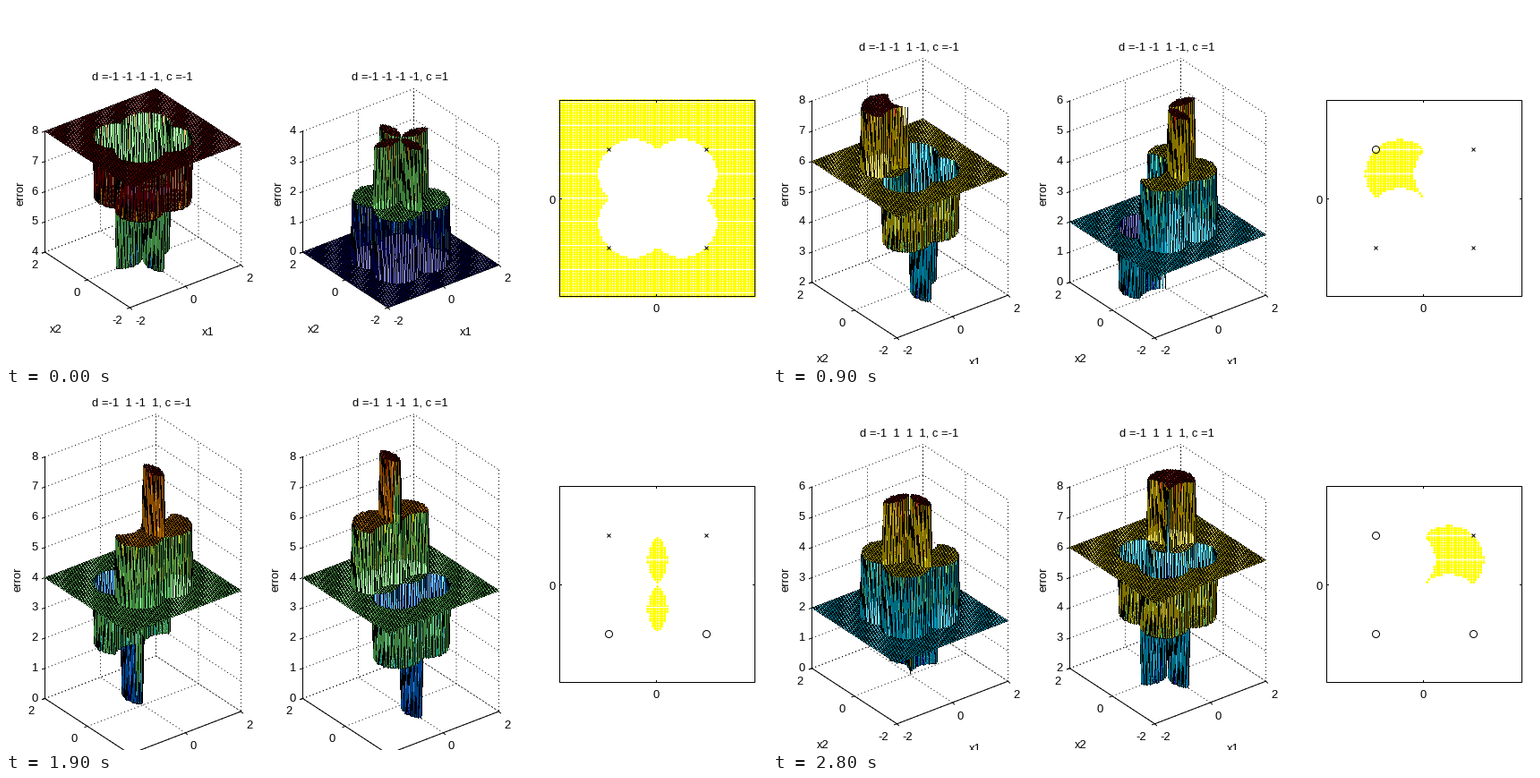
These frames come from a looping animation (850 by 400 pixels, 3250 ms). A matplotlib script:

```python
import itertools

import matplotlib.pyplot as plt
import numpy as np
from matplotlib.animation import FuncAnimation

W, H, DPI = 850, 400, 100
TICK = 50                                  # ms per step
HOLD = [9, 9, 9, 9, 2, 9, 9, 9]            # steps each target vector stays
PT = 72 / DPI                              # one pixel in points
ALPHA = 0.5
SAMPLES = [(1, 1), (1, -1), (-1, 1), (-1, -1)]
TARGETS = [(-1,) + t for t in itertools.product((-1, 1), repeat=3)]
PANELS = [(43, -1), (331, 1)]              # left edge, output weight c
BOX = (618, 836, 105, 324)
CX, CY, UNIT = 727, 214.5, 54.6

plt.rcParams.update({
    "font.family": "Liberation Sans",
    "font.size": 13 * PT,
})

# weight grid with step 0.05, kept as integers so ties are exact
steps = np.arange(-40, 41)
I, J = np.meshgrid(steps, steps, indexing="ij")
FIRES = [np.sign(20 * (a * I + b * J) - (I**2 + J**2)) for a, b in SAMPLES]
jet = plt.get_cmap("jet")


def error(target, c):
    return sum(abs(d - c * f) for d, f in zip(target, FIRES))


def project(x0, x1, x2, z, mid):
    px = x0 + (x1 + 2) * 31 + (2 - x2) * 23.75
    py = 207 - 33.75 * (z - mid) - (x1 + 2) * 11.9 + (2 - x2) * 15.5
    return px, py


def expand(start, count):
    """Turn runs into single positions plus the run each one belongs to."""
    count = count.ravel().astype(int)
    run = np.repeat(np.arange(count.size), count)
    first = np.repeat(np.cumsum(count) - count, count)
    return run, start.ravel()[run] + np.arange(run.size) - first


def fill_quads(img, qx, qy, nx, ny, color):
    n = qx.shape[1]
    cols = np.ceil(qx.min(axis=0)) + np.arange(3)[:, None]
    t = (cols - qx[:, None]) / (nx - qx)[:, None]
    y = qy[:, None] + t * (ny - qy)[:, None]
    hit = (t >= 0) & (t <= 1)
    top = np.where(hit, y, 1e6).min(axis=0)
    bottom = np.where(hit, y, -1e6).max(axis=0)
    start = np.ceil(top)
    run, rows = expand(start, np.maximum(np.floor(bottom) - start + 1, 0))
    r, c = rows.astype(int), cols.ravel()[run].astype(int)
    img[r, c] = img[r, c] * (1 - ALPHA) + color[run % n] * ALPHA


def stroke_edges(img, qx, qy, nx, ny):
    dx, dy = nx - qx, ny - qy
    steep = abs(dy) > abs(dx)
    a, b = np.where(steep, qy, qx), np.where(steep, ny, nx)
    start = np.ceil(np.minimum(a, b))
    run, pos = expand(start, np.ceil(np.maximum(a, b)) - start)
    t = (pos - a.ravel()[run]) / (b - a).ravel()[run]
    c = np.rint(qx.ravel()[run] + t * dx.ravel()[run]).astype(int)
    r = np.rint(qy.ravel()[run] + t * dy.ravel()[run]).astype(int)
    img[r, c] = (0, 0, 0, 1)


def paint_surface(img, x0, err):
    """Translucent faceted surface, painted back to front by diagonals."""
    lo, hi = err.min(), err.max()
    X, Y = project(x0, I / 20, J / 20, err, (lo + hi) / 2)
    colors = jet((err - lo) / (hi - lo))
    last = len(steps) - 2
    for diag in range(2 * last, -1, -1):
        i = np.arange(max(0, diag - last), min(diag, last) + 1)
        j = diag - i
        ci, cj = np.stack([i, i + 1, i + 1, i]), np.stack([j, j, j + 1, j + 1])
        qx, qy = X[ci, cj], Y[ci, cj]
        nx, ny = np.roll(qx, -1, axis=0), np.roll(qy, -1, axis=0)
        # a face tints the part of its outline that lies inside it
        stroke_edges(img, qx, qy, nx, ny)
        fill_quads(img, qx, qy, nx, ny, colors[i, j])


def paint_solutions(img, solved):
    """Small yellow dots where one of the two errors is zero."""
    c = np.rint(CX + UNIT / 20 * I[solved]).astype(int)
    r = np.rint(CY - UNIT / 20 * J[solved]).astype(int)
    for dr, dc in itertools.product((-1, 0, 1), (-1, 0, 1)):
        if dr == 0 or dc >= 0:
            img[r + dr, c + dc] = (1, 1, 0, 1)
    gaps = np.rint(213.5 + 26.7 * np.arange(-4, 5)).astype(int)
    img[gaps, 600:] = 0


fig = plt.figure(figsize=(W / DPI, H / DPI), dpi=DPI, facecolor="white")
ax = fig.add_axes([0, 0, 1, 1])
ax.axis("off")
ax.set_xlim(-0.5, W - 0.5)
ax.set_ylim(H - 0.5, -0.5)
ax.set_autoscale_on(False)


def line(points, style="-", z=1):
    return ax.plot(*zip(*points), color="k", lw=PT, ls=style, zorder=z,
                   snap=False)[0]


def label(x, y, text, ha="center"):
    return ax.text(x, y + 4.6, text, ha=ha, va="baseline", zorder=4)


def axes3d(x0, lo, hi, title):
    def at(x1, x2, z):
        return project(x0, x1, x2, z, (lo + hi) / 2)

    dots = (0, (1, 3))
    parts = []
    for v in (-2, 0, 2):
        parts.append(line([at(v, -2, lo), at(v, 2, lo), at(v, 2, hi)], dots))
        parts.append(line([at(-2, v, lo), at(2, v, lo), at(2, v, hi)], dots))
        x, y = at(v, -2, lo)
        parts.append(line([(x, y), (x + 2, y + 2)]))
        parts.append(label(x + 5.5, y + 14, str(v), "left"))
        x, y = at(-2, v, lo)
        parts.append(line([(x, y), (x - 3, y + 1)]))
        pad = 4.4 + 0.9 * (hi - lo)
        parts.append(label(x - pad, y + 13.2, str(v), "right"))
    for z in range(lo, hi + 1):
        parts.append(line([at(-2, 2, z), at(2, 2, z), at(2, -2, z)], dots))
        x, y = at(-2, 2, z)
        parts.append(line([(x, y), (x - 3, y + 1)]))
        parts.append(label(x - 11.5, y - 1.5, str(z)))
    parts.append(line([at(-2, 2, hi), at(-2, 2, lo),
                       at(-2, -2, lo), at(2, -2, lo)]))
    base = at(-2, 2, lo)[1]
    parts.append(label(x0 + 12.5, base + 85, "x2"))
    parts.append(label(x0 + 182.5, base + 88.5, "x1"))
    parts.append(label(x0 + 108.5, at(2, 2, hi)[1] - 14, title))
    parts.append(ax.text(x0 - 25 - 0.6 * (hi - lo), 209, "error", rotation=90,
                         ha="center", va="center"))
    return parts


def scene(target):
    img = np.zeros((H, W, 4))
    parts, errors = [], []
    for x0, c in PANELS:
        err = error(target, c)
        errors.append(err)
        paint_surface(img, x0, err)
        signs = " ".join(f"{d:2d}" for d in target)
        parts += axes3d(x0, int(err.min()), int(err.max()),
                        f"d ={signs}, c ={c}")
    paint_solutions(img, np.minimum(*errors) == 0)
    img[..., :3] /= np.maximum(img[..., 3:], 1e-9)
    parts.append(ax.imshow(np.clip(img, 0, 1), aspect="auto", zorder=2,
                           interpolation="nearest",
                           extent=(-0.5, W - 0.5, H - 0.5, -0.5)))
    for (a, b), d in zip(SAMPLES, target):
        parts += ax.plot(CX + a * UNIT, CY - b * UNIT, "o" if d > 0 else "x",
                         ms=(8 if d > 0 else 4) * PT, mew=PT, mec="k",
                         mfc="none", zorder=4)
    return parts


scenes = [scene(t) for t in TARGETS]

# frame of the flat panel, the same at all times
left, right, top, bottom = BOX
line([(left, top), (right, top), (right, bottom), (left, bottom),
      (left, top)], z=3)
for y, s in ((top, 1), (bottom, -1)):
    line([(CX - 1, y), (CX - 1, y + 2 * s)], z=3)
for x, s in ((left, 1), (right, -1)):
    line([(x, 215), (x + 2 * s, 215)], z=3)
label(726, 337, "0")
label(610, 216, "0")

order = np.repeat(np.arange(len(HOLD)), HOLD)


def update(k):
    for n, parts in enumerate(scenes):
        for part in parts:
            part.set_visible(n == order[k])
    return scenes[order[k]]


update(0)
anim = FuncAnimation(fig, update, frames=len(order), interval=TICK,
                     repeat=True, repeat_delay=0, blit=False)
plt.show()
```
